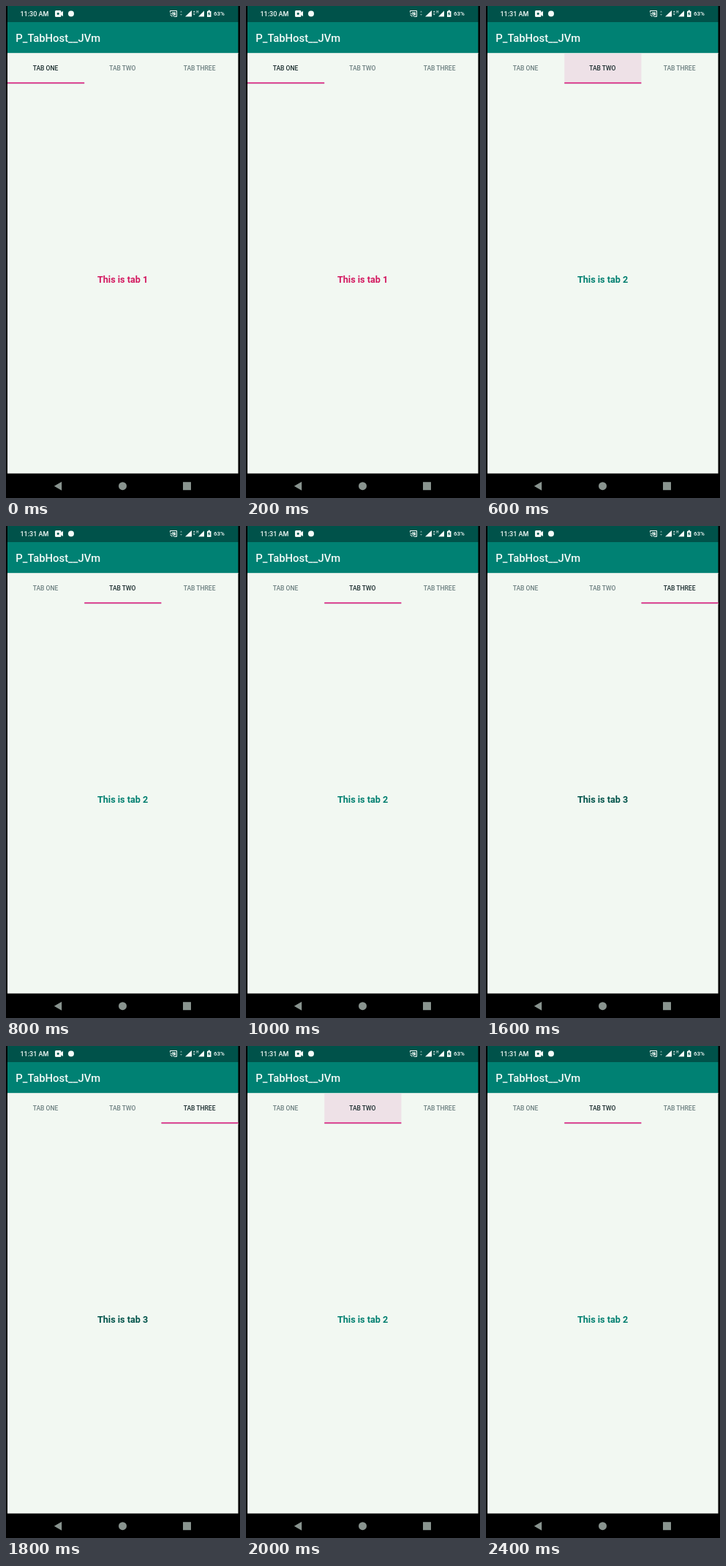
Write an HTML page that moves like this. It is 320 px wide and 672 px high and loops after 2.6 s.

```html
<!DOCTYPE html>
<html>
<head>
<meta charset="utf-8">
<style>
html, body { margin: 0; width: 100%; height: 100%; overflow: hidden; background: #000; }
svg { display: block; width: 320px; height: 672px; font-family: Roboto, sans-serif; font-weight: 500; }
.tab { font-size: 8.5px; text-anchor: middle; }
</style>
</head>
<body>
<svg viewBox="0 0 320 672">
  <rect width="320" height="672"/>
  <rect x="2" y="64" width="315.5" height="574.5" fill="#f2f8f2"/>
  <rect x="2" y="0" width="315.5" height="22" fill="#00524a"/>
  <rect x="2" y="22" width="315.5" height="42" fill="#008173"/>
  <rect x="2" y="64" width="315.5" height="1" fill="#c8dfd9"/>

  <g fill="#f4faf8">
    <text id="clock" x="19.5" y="13.6" font-size="9"></text>
    <path d="M68.500 6h5.500q1.500 0 1.500 1.500v1.300l2.500-2v7.400l-2.500-2v1.300q0 1.500-1.500 1.500h-5.500q-1.500 0-1.500-1.500v-6q0-1.500 1.500-1.500z"/>
    <circle cx="71.200" cy="10.500" r="1.500" fill="#00524a"/>
    <circle cx="89" cy="10.500" r="4"/>
    <path d="M224.500 8.500v-2h9v8h-3.500M224.500 10a4.500 4.500 0 0 1 4.500 4.500M224.500 12.200a2.300 2.300 0 0 1 2.300 2.300" fill="none" stroke="#f4faf8"/>
    <path d="M227 8.500h5v4.500h-2q-.8-2-3-3z" opacity=".8"/>
    <path d="M238 8.500l1.500-2 1.500 2zM238 11l1.500 2 1.500-2z" opacity=".5"/>
    <path d="M245 14.500l9-8.500v8.500zM263 14.500l8-8v8z"/>
    <path d="M255.800 8.500l1.500-2 1.500 2zM255.800 10.500l1.500 2 1.500-2z" opacity=".9"/>
    <text x="260.300" y="9.700" font-size="4.500">H</text>
    <path d="M275 7h1.500v-1.200h2.500v1.200h1.500v8h-5.500z"/>
    <path d="M277.200 8.500h1v2h1.200l-2 3v-2.200h-1.200z" fill="#00524a"/>
    <text x="284" y="13.400" font-size="8">63%</text>
    <text x="13.300" y="48.800" font-size="14.800">P_TabHost__JVm</text>
  </g>

  <rect id="press" y="65" width="105.200" height="39"/>
  <rect id="shade" y="106" width="105.200" height="1" fill="#dce3df"/>
  <rect id="line" y="104.200" width="105.200" height="1.800" fill="#dc3a8d"/>
  <text class="tab" x="54" y="88.400">TAB ONE</text>
  <text class="tab" x="159.300" y="88.400">TAB TWO</text>
  <text class="tab" x="264.600" y="88.400">TAB THREE</text>
  <text id="label" x="159.600" y="377.700" font-size="12.600" font-weight="700" text-anchor="middle"></text>

  <g fill="#89948f">
    <path d="M65.800 655.700l10.400-6v12z"/>
    <circle cx="159.500" cy="655.700" r="5.500"/>
    <rect x="242" y="650.200" width="11" height="11"/>
  </g>
</svg>
<script>
const LOOP = 2600;
const $ = id => document.getElementById(id);
const tabs = document.querySelectorAll('.tab');
const colors = ['#d3185f', '#007f70', '#00534a'];
const pressColors = ['#eee1e7', '#eee1e7', '#f2e0e2'];
// Each step: start time, selected tab, whether it is held down
const steps = [
  [0, 0, false],
  [600, 1, true],
  [800, 1, false],
  [1200, 2, true],
  [1400, 2, false],
  [2000, 1, true],
  [2200, 1, false]
];

function draw(now) {
  const t = now % LOOP;
  const [, tab, held] = steps.filter(s => s[0] <= t).pop();
  const x = 2 + tab * 105.2;
  for (const id of ['press', 'shade', 'line']) $(id).setAttribute('x', x);
  $('press').setAttribute('fill', held ? pressColors[tab] : 'none');
  tabs.forEach((el, i) => el.setAttribute('fill', i === tab ? '#192b2d' : '#6c7f80'));
  $('label').textContent = `This is tab ${tab + 1}`;
  $('label').setAttribute('fill', colors[tab]);
  $('clock').textContent = t < 600 ? '11:30 AM' : '11:31 AM';
}

const start = performance.now();
function tick() {
  draw(performance.now() - start);
  requestAnimationFrame(tick);
}
tick();
</script>
</body>
</html>
```
